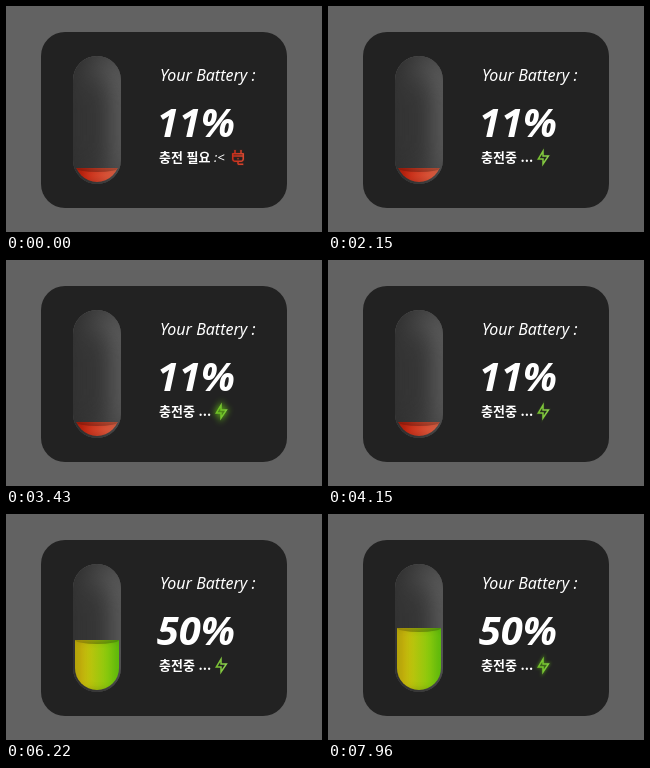
These frames come from a looping animation (316x226 px, 8 s). An HTML page:

```html
<!DOCTYPE html>
<html lang="ko">
<head>
<meta charset="utf-8">
<title>Battery</title>
<style>
  html, body { margin: 0; width: 100%; height: 100%; overflow: hidden; background: #626262; }
  .card { position: absolute; left: 35px; top: 26px; width: 246px; height: 176px; border-radius: 24px; background: #222; }
  .pill {
    position: absolute; left: 67px; top: 50px; width: 48px; height: 128px; border-radius: 24px; background: #333;
    box-shadow: inset 14px 0 34px hsl(0 0% 16%), inset -3px 8px 34px hsl(0 0% 52%);
  }
  .level { position: absolute; inset: 2px; border-radius: 22px; overflow: hidden; }
  .liquid {
    position: absolute; left: 0; right: 0; bottom: 0; overflow: hidden;
    background: linear-gradient(90deg, var(--from) 15%, var(--to));
    box-shadow: inset -7px 0 8px #0000001a, inset 8px 0 8px #00000026;
  }
  .liquid::after {
    content: ""; position: absolute; left: 0; right: 0; top: -4px; height: 8px; border-radius: 50%;
    background: linear-gradient(90deg, var(--from) 15%, var(--to));
    box-shadow: inset 0 -3px 5px #0003, inset 0 0 0 8px #00000026;
  }
  svg { position: absolute; left: 0; top: 0; }
  text { fill: #fff; font-family: "Noto Sans", "Open Sans", sans-serif; }
  .slanted { font-style: italic; font-weight: 500; }
  .korean { font-family: "Noto Sans CJK KR", "Noto Sans CJK", sans-serif; font-size: 13px; font-weight: 700; }
  #percent { font-size: 40px; font-weight: 800; }
  .glow { stroke-width: 2; }
</style>
</head>
<body>
<div class="card"></div>
<div class="pill"><div class="level"><div class="liquid" id="liquid"></div></div></div>
<svg width="316" height="226" viewBox="0 0 316 226">
  <defs>
    <linearGradient id="red"><stop offset=".15" stop-color="hsl(7 75% 45%)"/><stop offset="1" stop-color="hsl(9 65% 52%)"/></linearGradient>
    <linearGradient id="green"><stop offset=".15" stop-color="hsl(90 58% 48%)"/><stop offset="1" stop-color="hsl(92 60% 59%)"/></linearGradient>
    <path id="plug" d="M13 18V20H19V22H13C11.9 22 11 21.1 11 20V18H8C5.8 18 4 16.2 4 14V7C4 6.45 4.45 6 5 6H7V2H9V6H15V2H17V6H19C19.55 6 20 6.45 20 7V14C20 16.2 18.2 18 16 18ZM8 16H16C17.1 16 18 15.1 18 14V11H6V14C6 15.1 6.9 16 8 16ZM18 8H6V9H18ZM12 14.5a1 1 0 0 1 0-2a1 1 0 0 1 0 2Z" fill-rule="evenodd"/>
    <path id="bolt" d="M13 9H21L11 24V15H4L13 0ZM11 11V7.2L7.5 13H13V17.4L17.3 11Z" fill-rule="evenodd"/>
  </defs>
  <text class="slanted" x="154" y="75" font-size="16">Your Battery :</text>
  <text class="slanted" id="percent" x="229" y="131" text-anchor="end"></text>
  <g id="low">
    <text class="korean" x="153" y="155.5">충전 필요</text>
    <text class="slanted" x="208" y="155.5" font-size="13">:&lt;</text>
    <g transform="translate(223 142.5) scale(.75)">
      <use href="#plug" fill="url(#red)"/>
      <use class="glow" href="#plug" fill="hsl(7 89% 46%)" stroke="hsl(7 89% 46%)"/>
    </g>
  </g>
  <g id="charging">
    <text class="korean" x="153" y="155.5">충전중 ...</text>
    <g transform="translate(206 142.5) scale(.75)">
      <use href="#bolt" fill="url(#green)"/>
      <use class="glow" href="#bolt" fill="hsl(92 80% 42%)" stroke="hsl(92 80% 42%)"/>
    </g>
  </g>
</svg>
<script>
const LOOP = 8000, PULSE = 2400, RISE = 300, FULL_HEIGHT = 124;
const RED = ["hsl(7 85% 43%)", "hsl(12 75% 60%)"];
const ORANGE = ["hsl(22 85% 44%)", "hsl(50 78% 60%)"];
const YELLOW = ["hsl(54 89% 44%)", "hsl(92 88% 43%)"];

// Each state restarts the icon's pulse.
const states = [
  { start: 245 - PULSE, level: 11, colors: RED, charging: false },
  { start: 2000, level: 11, colors: RED, charging: true },
  { start: 4220, level: 25, colors: ORANGE, charging: true },
  { start: 6115, level: 50, colors: YELLOW, charging: true },
];

const byId = id => document.getElementById(id);
const liquid = byId("liquid"), percent = byId("percent");
const glows = document.querySelectorAll(".glow");

// CSS "ease": cubic-bezier(.25, .1, .25, 1)
function ease(x) {
  const curve = (s, a, b) => 3 * s * (1 - s) ** 2 * a + 3 * s * s * (1 - s) * b + s ** 3;
  let low = 0, high = 1;
  for (let i = 0; i < 20; i++) {
    const mid = (low + high) / 2;
    if (curve(mid, .25, .25) < x) low = mid; else high = mid;
  }
  return curve(low, .1, 1);
}

function draw() {
  const time = performance.now() % LOOP;
  const index = states.findLastIndex(state => state.start <= time);
  const state = states[index], previous = states[Math.max(index - 1, 0)];
  const age = time - state.start;

  const level = previous.level + (state.level - previous.level) * ease(Math.min(age / RISE, 1));
  liquid.style.height = level / 100 * FULL_HEIGHT + "px";
  liquid.style.setProperty("--from", state.colors[0]);
  liquid.style.setProperty("--to", state.colors[1]);
  percent.textContent = state.level + "%";

  byId("low").style.display = state.charging ? "none" : "";
  byId("charging").style.display = state.charging ? "" : "none";
  const pulse = (1 - Math.cos(age / PULSE * 2 * Math.PI)) / 2;
  for (const glow of glows) {
    glow.style.opacity = pulse;
    glow.style.filter = `blur(${4.5 * pulse}px)`;
  }
  requestAnimationFrame(draw);
}
draw();
</script>
</body>
</html>
```
